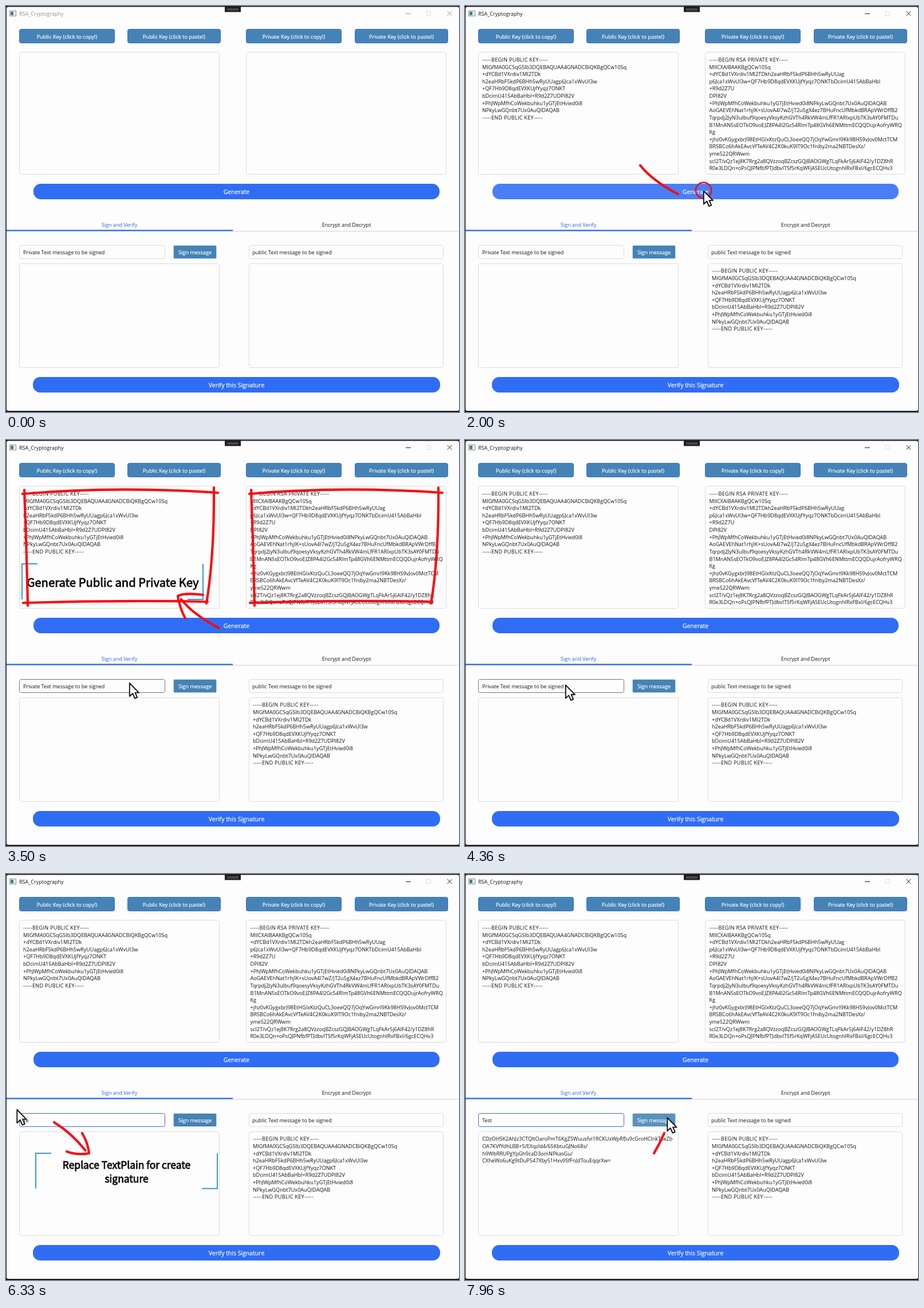
Animation of 791x708 px, one loop 8 s. Source, as an HTML page:

```html
<!DOCTYPE html>
<html lang="en">
<head>
<meta charset="utf-8">
<title>RSA_Cryptography</title>
<style>
  html, body { margin: 0; width: 100%; height: 100%; overflow: hidden; background: #111; }
  svg { display: block; width: 791px; height: 708px; }
  text { font: 9.05px "Open Sans", "Noto Sans", sans-serif; fill: #141414; white-space: pre; }
  .mid { text-anchor: middle; }
  .btn, .big { fill: #fff; stroke: #fff; stroke-width: .2px; font-size: 9.2px; }
  .big { font-size: 10.5px; }
  .key { font-size: 9.1px; }
  .banner { letter-spacing: .28px; }
  .box { fill: #fdfdfd; stroke: #dcdcdc; }
  .note { font: 400 20.25px "Noto Sans CJK SC", "Noto Sans CJK JP", "Noto Sans", sans-serif;
          fill: #0c0c0c; stroke: #0c0c0c; stroke-width: .8px; }
  .small { font-size: 17.4px; }
  .ink { fill: none; stroke: #fb0a0f; stroke-width: 4.2; stroke-linecap: round; stroke-linejoin: round; }
  .bracket { fill: none; stroke: #3a98d8; stroke-width: 2; }
</style>
</head>
<body>
<svg id="stage" viewBox="0 0 791 708"></svg>
<script>
const LOOP = 8000;
const stage = document.getElementById('stage');

function add(tag, attrs, parent = stage) {
  const el = document.createElementNS('http://www.w3.org/2000/svg', tag);
  for (const k in attrs) el.setAttribute(k, attrs[k]);
  parent.appendChild(el);
  return el;
}
const rect = (x, y, width, height, more) => add('rect', { x, y, width, height, ...more });
function label(x, y, str, cls = '', parent = stage) {
  const el = add('text', { x, y, class: cls }, parent);
  el.textContent = str;
  return el;
}
const box = (x, y, w, h) => rect(x + .5, y + .5, w, h, { class: 'box', rx: 3 });
function lines(x, y, list) {
  const g = add('g', {});
  list.forEach((s, i) => label(x, y + i * 12.62, s, s.startsWith('--') ? 'key banner' : 'key', g));
  return g;
}
const show = (el, on) => el.setAttribute('visibility', on ? 'visible' : 'hidden');
const fill = (el, c) => el.style.fill = c;
const clamp = v => Math.max(0, Math.min(1, v));
const span = (t, a, b) => clamp((t - a) / (b - a));

const publicKey = `-----BEGIN PUBLIC KEY-----
MIGfMA0GCSqGSIb3DQEBAQUAA4GNADCBiQKBgQCw10Sq
+dYCBd1VXrdiv1MI2TDk
h2eaHRbF5kdP6BHh5wRyUUagp6Jca1xWvUI3w
+QF7Hb9D8qdEVXKUjfYyqz7ONKT
bDcimU415AbBaHbI+R9d2Z7UDPI82V
+PhJWpMfhCoWekbuhku1yGTjEtHvied0i8
NPkyLwGQnbt7Ux0AuQIDAQAB
-----END PUBLIC KEY-----`.split('\n');
const privateKey = `-----BEGIN RSA PRIVATE KEY-----
MIICXAIBAAKBgQCw10Sq
+dYCBd1VXrdiv1MI2TDkh2eaHRbF5kdP6BHh5wRyUUag
p6Jca1xWvUI3w+QF7Hb9D8qdEVXKUjfYyqz7ONKTbDcimU415AbBaHbI
+R9d2Z7U
DPI82V
+PhJWpMfhCoWekbuhku1yGTjEtHvied0i8NPkyLwGQnbt7Ux0AuQIDAQAB
AoGAEVEhNat1rhjIK+sUovA4I7wZ/jT2u5gX4ez7BHuFncUfMbkdBRApVWrDffB2
Tqrpdj2JyN3uIbuf9qoesyVksyKzhGVTh4RkVW4mLfFR1ARIxpUbTK3sAY0FMTDu
B1MnAN5sEOTkO9voEJZ8PA4I2Gc54RImTp48GVh6ENMttmECQQDujrAofryWRQ
Kg
+jhz0vKGygxbrJ98EtHGIxKtzQuCL3oeeQQ7jOqYwGmrI9Kk98HS9vJov0MctTCM
BRSBCo6hAkEAvcVfTeAV4C2K0kuK9IT9Oc1fniby2ma2NBTDesXz/
yme522QRWwm
scI2T/vQz1ej8K7Rrg2a8QVzzoqBZcszGQJBAOGWgTLqFkAr5j6AIF42/y1DZ8hR
R0e3LDQn+oPsQJPNfbfPTJdbvITSf5rKqWFjASEUcUtognhIRxFBxI/6gcECQHv3`.split('\n');
const signature = `CDzOHSK2AhJz3CTQltOaroPmT6KgZ5Wuusfvi1RCKUxWpRfJu9cGroHClnkTaeZb
OA7KVfYdhLBB+S/EXqzld4/65KbtuGJNo68s/
h9WbRRUPgYpGh9caD3omNPkasGu/
CXheWo6uKg9tDuP547Xby51Hxv9SfFnJdTouEqqrXw=`.split('\n');

// Window frame
rect(0, 0, 791, 708, { fill: '#161616' });
rect(1, 1.5, 790, 704.5, { fill: '#fdfdfd', rx: 3 });
rect(382, 0, 28, 10.5, { fill: '#1e1e1e' });
rect(386, 4, 20, 4, { fill: '#484848' });
rect(6.5, 8.5, 11, 9, { fill: '#f2f2f2', stroke: '#8c8c8c' });
rect(8, 10, 5, 6, { fill: '#3f7f80' });
const title = label(23, 17, 'RSA_Cryptography');
const winButtons = add('path', { d: 'M698 13.5H707M770.5 9l8 8M778.5 9l-8 8', fill: 'none' });
rect(734.5, 9.5, 7, 7, { fill: 'none', stroke: '#dedede' });

// Key area
[[23.5, 166, 'Public Key (click to copy!)'], [212.5, 162, 'Public Key (click to paste!)'],
 [419.5, 166, 'Private Key (click to copy!)'], [609.5, 162, 'Private Key (click to paste!)']]
  .forEach(([x, w, s]) => {
    rect(x, 40.5, w, 24, { fill: '#4583b6', stroke: '#2f6cee', rx: 3 });
    label(x + w / 2, 56.8, s, 'btn mid');
  });
box(23, 80, 349, 213);
box(419, 80, 349, 213);
const generate = rect(48, 310, 709, 27, { rx: 12.5 });
label(402.5, 328, 'Generate', 'big mid');

// Tabs
rect(396, 392, 395, 1.5, { fill: '#dedede' });
rect(1, 390.3, 395, 2.4, { fill: '#2f6cee' });
fill(label(198, 385, 'Sign and Verify', 'mid'), '#2f62dc');
label(594.5, 385, 'Encrypt and Decrypt', 'mid');

// Signing area
const field = box(23, 417, 254, 23);
const selection = rect(29, 423, 144, 13, { fill: '#8fc3ec' });
const fieldText = label(30, 433.2, '');
box(424, 417, 339, 23);
label(430, 433.2, 'public Text message to be signed');
const sign = rect(292.5, 417.5, 75, 23, { rx: 2, stroke: '#c9d9ea' });
label(330, 433.2, 'Sign message', 'btn mid');
box(23, 449, 349, 181);
box(424, 449, 339, 181);
rect(47, 647, 711, 27, { rx: 12.5, fill: '#306df5' });
label(402.5, 665.3, 'Verify this Signature', 'big mid');

const keys = [lines(30, 97, publicKey), lines(426.5, 97, privateKey), lines(431, 465.3, publicKey)];
const signed = lines(30, 465.3, signature);

// Callouts: two corner brackets around a caption
function callout(x, y, w, h, start, end, caption) {
  const corner = d => add('path', { d, class: 'bracket', pathLength: 1 });
  const a = corner(`M${x} ${y + h}V${y}H${x + 27}`);
  const b = corner(`M${x + w} ${y}V${y + h}H${x + w - 27}`);
  const g = add('g', {});
  caption.forEach(([cx, cy, s, cls]) => label(cx, cy, s, 'note mid ' + cls, g));
  const trim = (el, p) => {
    show(el, p > 0);
    el.setAttribute('stroke-dasharray', `${p} 2`);
  };
  return t => {
    trim(a, span(t, start, start + 450) - span(t, end, end + 470));
    trim(b, span(t, start, start + 450) - span(t, end + 140, end + 610));
    g.setAttribute('opacity', span(t, start + 150, start + 500) - span(t, end + 250, end + 650));
  };
}
const callouts = [
  callout(28, 216, 316, 62, 2350, 3710, [[186.5, 256, 'Generate Public and Private Key', '']]),
  callout(52, 487, 317, 61.5, 5800, 6960, [
    [210.5, 513.5, 'Replace TextPlain for create', 'small'],
    [210.5, 537.5, 'signature', 'small']])
];

// Hand-drawn strokes: path, start, end, fade start, transform
const strokes = [
  ['M372 328C345 314 322 298 306 278', 1500, 1980, 3720],
  ['M344 270Q311 266 300 272Q303 292 313 311', 2330, 2700, 3720],
  ['M84 433Q115 452 138.5 482', 5000, 5500, 7150],
  ['M133 452Q143 468 145 487Q126 491 106 484', 5515, 5930, 7150],
  ['M330 487Q340 470 348 452', 7780, 7960, 9000]
];
const frameSides = [
  'M32 87Q36 190 38 289', 'M30 284Q190 279 352 282',
  'M350 285Q364 200 363 83', 'M370 92Q190 80 29 94'
];
frameSides.forEach((d, i) => ['', 'translate(396.4) scale(.988 1)'].forEach(move => {
  const at = 2330 + i * 280;
  strokes.push([d, at, at + 270, 3720, move]);
}));
const inks = strokes.map(([d, a, b, out, transform = '']) => {
  const el = add('path', { d, class: 'ink', pathLength: 1, transform });
  return t => {
    const p = span(t, a, b);
    show(el, p > 0);
    el.setAttribute('stroke-dasharray', `${p} 2`);
    el.setAttribute('opacity', 1 - span(t, out, out + 500));
  };
});

// Pointer
const ring = add('circle', { fill: 'none', stroke: '#f30d16', 'stroke-width': 2.6 });
const clicks = [[1600, 416.5, 321.5], [4530, 235, 428]];
const pointer = add('path', {
  d: 'M.8 1V24L6.2 19L10 27.6L14.2 25.8L10.5 17.6H17Z',
  fill: '#fff', stroke: '#111', 'stroke-width': 1.9, 'stroke-linejoin': 'round'
});
const route = [
  [560, 790, 602], [1000, 468.5, 338], [1200, 416, 321.5], [2980, 416, 321.5],
  [3130, 395, 334], [3480, 215, 423], [3700, 215, 423], [4050, 18, 422],
  [4480, 235, 428], [4560, 235, 428], [5050, 18.5, 410], [6950, 18.5, 410],
  [7100, 44, 413], [7760, 293, 423], [7950, 352.5, 424], [8000, 352.5, 424]
];
function pointerAt(t) {
  const i = route.findIndex(r => r[0] >= t);
  if (i < 1) return route[0].slice(1);
  const [a, b] = [route[i - 1], route[i]];
  const p = span(t, a[0], b[0]);
  return [a[1] + (b[1] - a[1]) * p, a[2] + (b[2] - a[2]) * p];
}

const typing = [[6430, 'Test'], [6360, 'Tes'], [6290, 'Te'], [6220, 'T'],
                [0, 'Private Text message to be signed']];

function draw(t) {
  const [x, y] = pointerAt(t);
  const over = (l, top, r, b) => t >= 560 && x >= l && x <= r && y >= top && y <= b;
  show(pointer, t >= 560);
  pointer.setAttribute('transform', `translate(${x} ${y})`);

  const active = t >= 1600;
  fill(title, active ? '#141414' : '#8f8f8f');
  winButtons.style.stroke = active ? '#222' : '#999';
  keys.forEach(k => show(k, t >= 1700));
  show(signed, t >= 6700);

  fill(generate, over(48, 310, 757, 337) ? '#497ef6' : '#306df5');
  fill(sign, over(293, 418, 368, 441) ? '#5a92bd' : '#4583b6');
  field.style.stroke = t >= 4500 ? '#3a70dc' : over(24, 417, 278, 441) ? '#777' : '#dcdcdc';

  fieldText.textContent = typing.find(s => t >= s[0])[1];
  const left = Math.max(29, Math.min(173, x));
  selection.setAttribute('x', left);
  selection.setAttribute('width', 173 - left);
  show(selection, t >= 4560 && t < 6220);

  const hit = clicks.find(c => t >= c[0] && t < c[0] + 600);
  show(ring, hit);
  if (hit) {
    ring.setAttribute('cx', hit[1]);
    ring.setAttribute('cy', hit[2]);
    ring.setAttribute('r', 13.7 * span(t, hit[0], hit[0] + 380));
    ring.setAttribute('opacity', 1 - span(t, hit[0] + 450, hit[0] + 600));
  }
  callouts.forEach(f => f(t));
  inks.forEach(f => f(t));
}

const begin = performance.now();
function tick() {
  draw((performance.now() - begin) % LOOP);
  requestAnimationFrame(tick);
}
tick();
</script>
</body>
</html>
```
